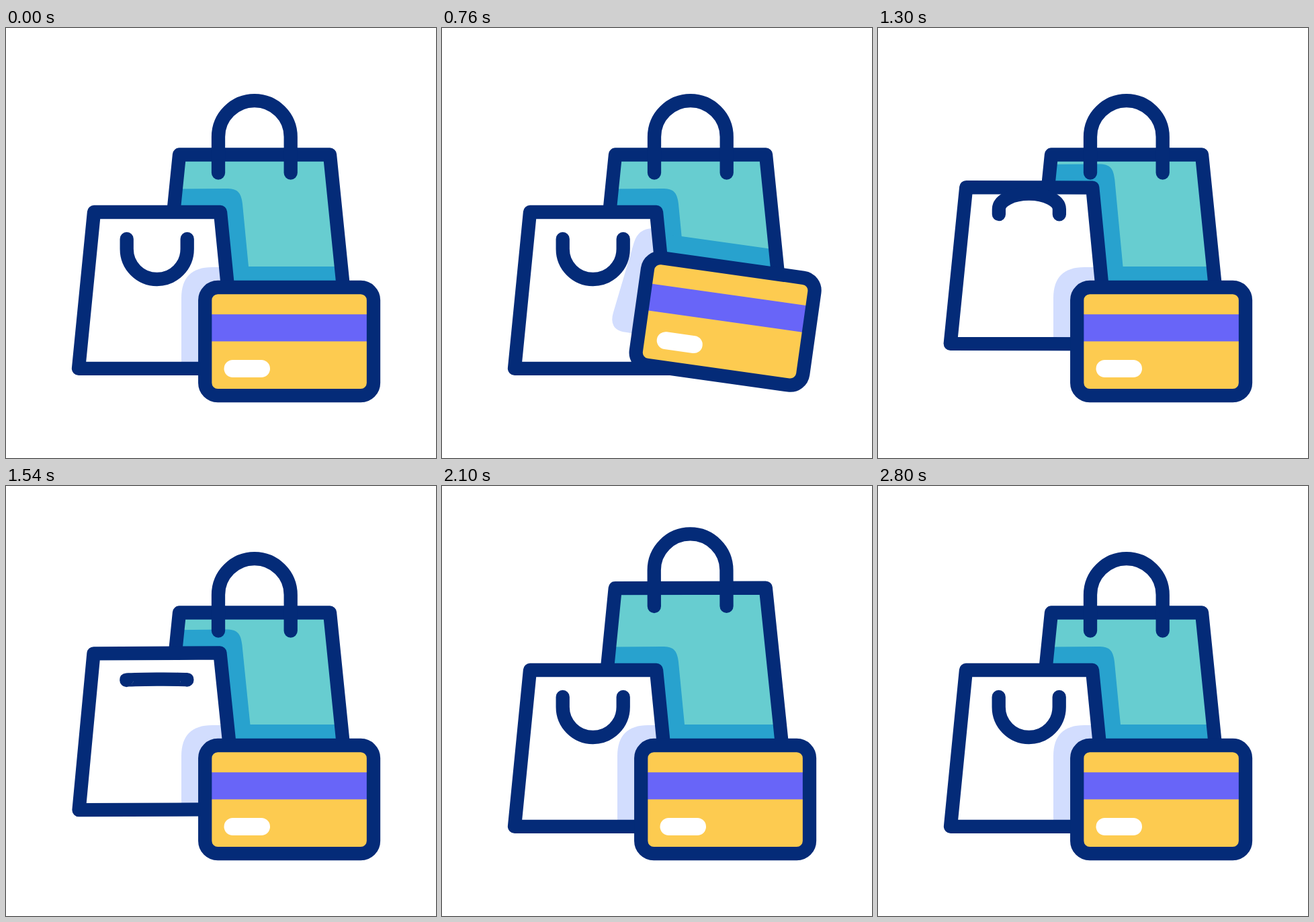
Animation of 640 by 640 pixels, one loop 2820 ms. Source, as an HTML page:

```html
<!DOCTYPE html>
<html lang="en">
<head>
<meta charset="utf-8">
<title>Shopping bags and card</title>
<style>
  html, body { margin: 0; width: 100%; height: 100%; overflow: hidden; background: #fff; }
  svg { display: block; width: 100%; height: 100%; }
  .line { fill: none; stroke: #042b78; stroke-width: 20.3; stroke-linecap: round; stroke-linejoin: round; }
  .shade { fill: #28a2ce; }
</style>
</head>
<body>
<svg viewBox="0 0 640 640">
  <defs>
    <path id="backShape" d="M258 188.5H482L508.5 450H231.5Z"/>
    <path id="frontShape" d="M131 274H319L342 506.8H108Z"/>
    <clipPath id="backClip"><use href="#backShape" class="back"/></clipPath>
    <clipPath id="frontClip"><use href="#frontShape" class="front"/></clipPath>
  </defs>

  <use href="#backShape" class="back" fill="#67cdd0"/>
  <g clip-path="url(#backClip)">
    <path class="front shade" d="M180 240L328 239C346 239 350 246 352 262L361 355L377 520H180Z"/>
    <rect id="cardShade" class="shade" x="262" width="340" height="240"/>
  </g>
  <g class="back line">
    <use href="#backShape"/>
    <path d="M316 215.6V162A53.85 53.85 0 0 1 423.7 162V215.6"/>
  </g>

  <use href="#frontShape" class="front" fill="#fff"/>
  <g clip-path="url(#frontClip)">
    <path id="lilac" fill="#d2ddfe"/>
  </g>
  <g class="front line">
    <use href="#frontShape"/>
    <path id="handle"/>
  </g>

  <g id="card">
    <rect x="296.2" y="386" width="250.8" height="161.2" rx="19" fill="#fdcb50"/>
    <rect x="297" y="426.2" width="249" height="40.2" fill="#6865f8"/>
    <rect x="324.5" y="494" width="68.5" height="26" rx="13" fill="#fff"/>
    <rect class="line" x="296.2" y="386" width="250.8" height="161.2" rx="19"/>
  </g>
</svg>
<script>
const LOOP = 2820, STEP = 20, STAGGER = 800;
const CARD_X = 421.6, CARD_Y = 466.6, TILT = 8;
const SWING_START = 260, SWING_HALF = 241, SWING = 10;

const $ = id => document.getElementById(id);
const backParts = document.querySelectorAll('.back');
const frontParts = document.querySelectorAll('.front');

const linear = u => u;
const smooth = u => u * u * (3 - 2 * u);
const easeOut = u => Math.sin(u * Math.PI / 2);
const ramp = (t, from, to, ease = smooth) =>
  ease(Math.min(1, Math.max(0, (t - from) / (to - from))));
const mix = (a, b, k) => a + (b - a) * k;

// Goes 0 to 1 during [a, b] and back to 0 during [c, d]
const pulse = (t, a, b, c, d, ease) => ramp(t, a, b) - ramp(t, c, d, ease);

const bagLift = t => -37 * pulse(t, 0, 400, 460, 1200);

// Three half waves, ending upright
function bagSwing(t) {
  const u = (t - SWING_START) / SWING_HALF;
  return u > 0 && u < 3 ? SWING * Math.sin(u * Math.PI) : 0;
}

function place(parts, dy, angle, x, y) {
  for (const part of parts)
    part.setAttribute('transform', `translate(0 ${dy}) rotate(${angle} ${x} ${y})`);
}

// Card shadow on the front bag: the left end of a rounded, leaning slab
function drawLilac(k, dy) {
  const right = 345;
  const top = [mix(261, 292, k), mix(356, 328, k) + dy];
  const low = [mix(261, 247.5, k), mix(505, 478.5, k) + dy];
  const lowRight = [right, mix(505, 494, k) + dy];
  const toward = (a, b, r) => {
    const f = r / Math.hypot(b[0] - a[0], b[1] - a[1]);
    return [mix(a[0], b[0], f), mix(a[1], b[1], f)];
  };
  const topR = mix(46, 22, k), lowR = mix(0, 26, k);
  $('lilac').setAttribute('d', `M${right} ${top[1]}H${top[0] + topR}`
    + `Q${top} ${toward(top, low, topR)}L${toward(low, top, lowR)}`
    + `Q${low} ${toward(low, lowRight, lowR)}L${lowRight}Z`);
}

function drawHandle(t) {
  const s = 1 - 2 * pulse(t, 0, 260, 260, 1240, linear);
  const bend = 314 + 15 * s, ry = Math.max(0.01, Math.abs(45 * s));
  $('handle').setAttribute('d',
    `M179.7 314V${bend}A45 ${ry} 0 0 ${s > 0 ? 0 : 1} 269.7 ${bend}V314`);
}

function draw(t) {
  const lift = -64.5 * pulse(t, 0, 510, 510, 1200, easeOut);
  const k = pulse(t, 0, 340, 760, 1120);
  place([$('card'), $('cardShade')], lift, TILT * k, CARD_X, CARD_Y);
  $('cardShade').setAttribute('y', CARD_Y - 111.6 - 5 * k);
  drawLilac(k, lift);

  const front = t - STAGGER, back = t - 2 * STAGGER;
  place(frontParts, bagLift(front), bagSwing(front), 225, 390);
  place(backParts, bagLift(back), -bagSwing(back), 370, 287);
  drawHandle(front);
}

const start = performance.now();
function tick() {
  const t = (performance.now() - start) % LOOP;
  draw(Math.floor(t / STEP) * STEP);
  requestAnimationFrame(tick);
}
tick();
</script>
</body>
</html>
```
